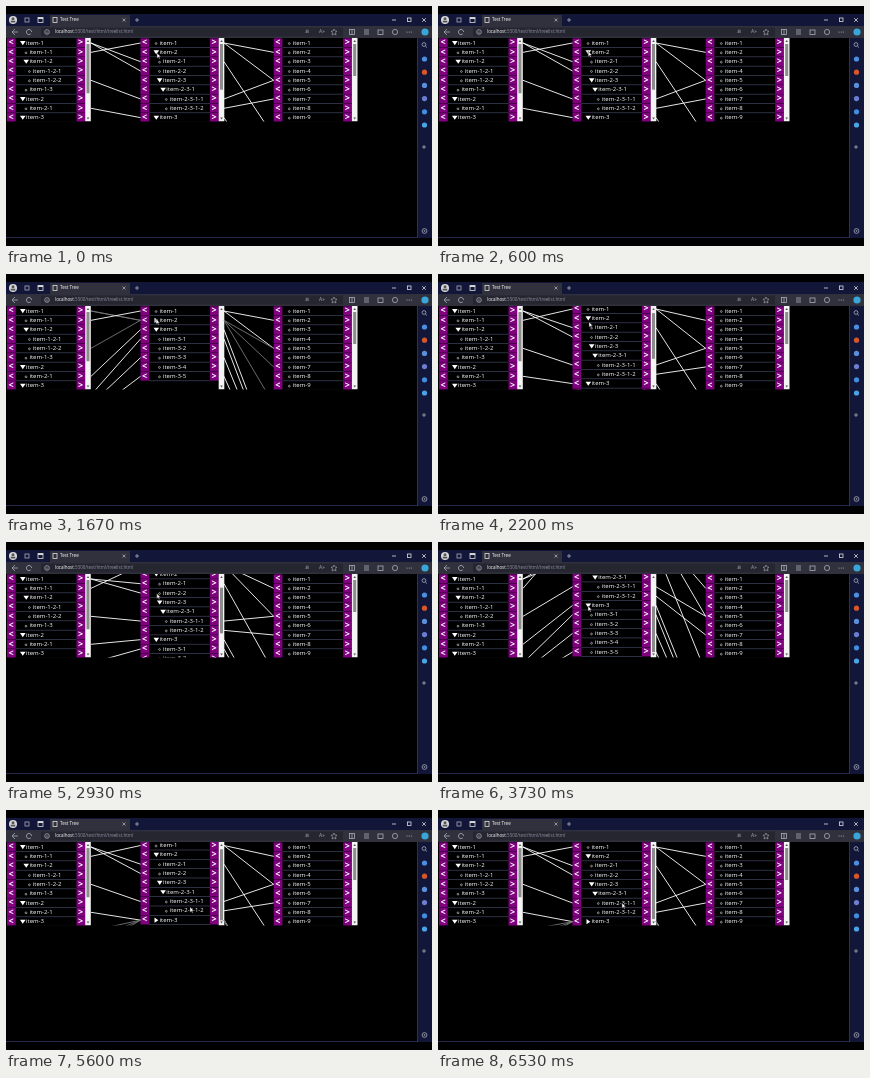
These frames come from a looping animation (426x240 px, 6.59 s). An HTML page with a canvas:

```html
<!DOCTYPE html>
<html>
<head>
<meta charset="utf-8">
<style>
html, body { margin: 0; width: 100%; height: 100%; overflow: hidden; background: #000; }
canvas { display: block; width: 426px; height: 240px; }
</style>
</head>
<body>
<canvas id="stage" width="426" height="240"></canvas>
<script>
const g = document.getElementById('stage').getContext('2d');
const LOOP = 6590, STEP = 200 / 3;
const ROW = 9.33, TOP = 32, BOTTOM = 115.5, VIEW = BOTTOM - TOP;
const FONT = '"Open Sans", "Noto Sans", sans-serif';
const NAVY = '#12173a', GREY = '#a9abb8';

const names = s => s.split(' ').map(n => 'item-' + n);
const left = names('1 1-1 1-2 1-2-1 1-2-2 1-3 2 2-1 3 3-1 3-2 3-3 3-4');
const middle = names('1 2 2-1 2-2 2-3 2-3-1 2-3-1-1 2-3-1-2 3 3-1 3-2 3-3 3-4 3-5');
const right = Array.from({ length: 20 }, (_, i) => 'item-' + (i + 1));

// [row in the outer list, item in the middle list]
const leftLinks = [[0, '2-1'], [0, '2-2'], [1, '1'], [4, '2-3-1-1'], [7, '3'],
  [9, '3-1'], [10, '3-3'], [11, '3-5']];
const rightLinks = [[1, '1'], [4, '1'], [10, '2-1'], [4, '2-3-1-1'], [6, '2-3-1-2'],
  [16, '3'], [17, '3-1'], [18, '3-3'], [19, '3-5']];

// Keys: [time, value, ...]
const scrollKeys = [[0, 0], [2067, 0], [2133, 2], [2667, 2], [3267, 48.2], [4199, 48.2],
  [4200, 1.5], [6200, 1.5], [6400, 0]];
const pointerKeys = [[0, 151, 47], [800, 150, 45], [1800, 150, 45], [2133, 151, 48],
  [2667, 151, 48], [3333, 150, 64], [4667, 150, 64], [5400, 184, 97], [6100, 184, 97],
  [6400, 184, 93]];

function at(keys, t) {
  let i = keys.findIndex(k => k[0] > t);
  if (i < 0) i = keys.length;
  const a = keys[i - 1], b = keys[i] || a;
  const p = b === a ? 0 : (t - a[0]) / (b[0] - a[0]);
  const e = p * p * (3 - 2 * p);
  return a.slice(1).map((v, j) => v + (b[j + 1] - v) * e);
}

function rect(x, y, w, h, color) {
  g.fillStyle = color;
  g.fillRect(x, y, w, h);
}

function text(s, x, y, size, color = '#fff', weight = 400) {
  g.font = `${weight} ${size}px ${FONT}`;
  g.fillStyle = color;
  g.fillText(s, x, y);
}

function path(points, color, width = 0.8, fill = false) {
  g.beginPath();
  points.forEach(p => g.lineTo(p[0], p[1]));
  if (fill) {
    g.fillStyle = color;
    g.fill();
  } else {
    g.strokeStyle = color;
    g.lineWidth = width;
    g.stroke();
  }
}

function circle(x, y, r, color, fill = true, start = 0) {
  g.beginPath();
  g.arc(x, y, r, start, Math.PI * 2);
  g.fillStyle = g.strokeStyle = color;
  g.lineWidth = 0.8;
  fill ? g.fill() : g.stroke();
}

function box(x, y, w, h, color = GREY) {
  g.strokeStyle = color;
  g.lineWidth = 0.8;
  g.strokeRect(x, y, w, h);
}

function cross(x, y, r, color = GREY) {
  path([[x - r, y - r], [x + r, y + r]], color);
  path([[x - r, y + r], [x + r, y - r]], color);
}

function plus(x, y, color = GREY) {
  path([[x - 2, y], [x + 2, y]], color);
  path([[x, y - 2], [x, y + 2]], color);
}

function drawBrowser() {
  rect(0, 0, 426, 240, '#000');
  rect(0, 8, 426, 12, NAVY);
  rect(44, 9, 80, 11, '#30313c');
  rect(0, 20, 426, 12, '#30313c');
  rect(35, 21.5, 302, 9, '#252630');
  rect(411, 32, 15, 200, NAVY);
  rect(0, 231, 412, 1, '#25284a');
  rect(411, 32, 0.8, 200, '#34375a');

  circle(7, 14, 4, '#d8d8dc');
  circle(7, 12.8, 1.5, '#555');
  rect(4.7, 14.7, 4.6, 1.8, '#555');
  box(19, 12, 4, 4);
  box(32, 11.5, 5, 5, '#ddd');
  rect(32, 11.5, 5, 1.5, '#ddd');
  box(47, 11.5, 4, 5, '#ddd');
  text('Test Tree', 54, 14, 4.5);
  cross(118, 14, 1.5);
  plus(131, 14);
  path([[386, 14], [390, 14]], '#ddd');
  box(401.5, 12, 3.5, 3.5, '#ddd');
  cross(418, 14, 1.8, '#ddd');

  path([[12, 26], [6, 26]], GREY);
  path([[9, 23], [6, 26], [9, 29]], GREY);
  circle(23, 26, 2.6, GREY, false, 0.8);
  circle(41, 26, 2.3, GREY, false);
  path([[41, 25.5], [41, 27.3]], GREY);
  text('localhost', 49, 26, 4.5);
  text(':5500/test/html/treelist.html', 49 + g.measureText('localhost').width, 26, 4.5, '#9092a4');
  text('あ', 299, 26, 4.5, GREY);
  text('A»', 313, 26, 5, GREY);
  path([[328, 23], [329, 25], [331, 25.3], [329.5, 26.7], [330, 29], [328, 27.8],
    [326, 29], [326.5, 26.7], [325, 25.3], [327, 25], [328, 23]], GREY, 0.6);
  box(343.5, 23.5, 5, 5);
  path([[346, 23.5], [346, 28.5]], GREY);
  path([[358, 24], [363, 24]], GREY);
  path([[358, 26], [363, 26]], GREY);
  path([[358, 28], [363, 28]], GREY);
  box(372, 24, 5, 4.5);
  circle(389, 26, 2.6, GREY, false);
  for (const x of [401, 403.2, 405.4]) circle(x, 26, 0.6, GREY);
  circle(419, 26, 3.6, '#3aa5d8');

  circle(418, 38.5, 1.9, GREY, false);
  path([[419.4, 40], [421, 41.6]], GREY);
  ['#4b8fe0', '#d9562c', '#5b8fd8', '#6c7ed0', '#3f8fdc', '#49a5e4'].forEach((c, i) =>
    circle(418.5, 53 + i * 13.2, 2.6, c));
  plus(418, 141);
  circle(418.5, 225, 2.4, GREY, false);
  circle(418.5, 225, 0.8, GREY);
}

function drawRow(x, y, name, isParent, closed, flat) {
  const depth = flat ? 0 : name.split('-').length - 2;
  const tx = x + 19 + depth * 3.4;
  rect(x, y - 4.66, 8.7, 9, '#800080');
  rect(x + 69.5, y - 4.66, 8.7, 9, '#800080');
  text('<', x + 1.6, y, 9, '#fff', 700);
  text('>', x + 71.1, y, 9, '#fff', 700);
  rect(x + 8.7, y + 4.2, 60.8, 0.6, '#4c5070');
  if (!isParent) circle(tx - 3.4, y + 0.5, 0.9, '#aaa', false);
  else if (closed) path([[tx - 5, y - 2.6], [tx - 1.2, y], [tx - 5, y + 2.6]], '#fff', 0, true);
  else path([[tx - 6, y - 2], [tx - 0.4, y - 2], [tx - 3.2, y + 2.2]], '#fff', 0, true);
  text(name, tx, y, 6);
}

function drawList(x, items, scroll, closed, flat, all = items) {
  items.forEach((name, i) => {
    const isParent = !flat && all.some(n => n.startsWith(name + '-'));
    drawRow(x, rowY(i) - scroll, name, isParent, name === closed, flat);
  });
  const bar = x + 78.2, total = items.length * ROW;
  rect(bar, TOP, 5.6, VIEW, '#f4f4f4');
  path([[bar + 1.5, 36], [bar + 2.8, 34], [bar + 4.1, 36]], '#555', 0, true);
  path([[bar + 1.5, 111.5], [bar + 2.8, 113.5], [bar + 4.1, 111.5]], '#555', 0, true);
  if (total > VIEW) {
    const track = VIEW - 12;
    rect(bar + 1.3, TOP + 6 + scroll / total * track, 3, VIEW / total * track, '#8c8c8c');
  }
}

const rowY = i => 37 + i * ROW;

function drawLinks(links, shown, closed, scroll, outerX, innerX) {
  for (const [row, id] of links) {
    let i = shown.indexOf('item-' + id);
    const hidden = i < 0;
    if (hidden) i = shown.indexOf(closed);
    path([[outerX, rowY(row)], [innerX, rowY(i) - scroll]], hidden ? '#777' : '#fff', 0.9);
  }
}

function draw(t) {
  const [scroll] = at(scrollKeys, t);
  const closed = t >= 860 && t < 1730 ? 'item-2' : t >= 4200 ? 'item-3' : '';
  const shown = middle.filter(n => !closed || !n.startsWith(closed + '-'));

  g.textBaseline = 'middle';
  drawBrowser();
  g.save();
  g.beginPath();
  g.rect(0, TOP, 411, VIEW);
  g.clip();
  drawList(1, left, 0);
  drawList(134.5, shown, scroll, closed, false, middle);
  drawList(267.7, right, 0, '', true);
  drawLinks(leftLinks, shown, closed, scroll, 85, 134.5);
  drawLinks(rightLinks, shown, closed, scroll, 267.7, 218);
  g.restore();

  const [x, y] = at(pointerKeys, t);
  const arrow = [[0, 0], [0, 5.2], [1.3, 4.1], [2.2, 6], [3, 5.6], [2.2, 3.8], [3.8, 3.7], [0, 0]]
    .map(p => [x + p[0], y + p[1]]);
  path(arrow, '#fff', 0, true);
  path(arrow, '#222', 0.5);
}

const start = performance.now();
function tick() {
  const t = (performance.now() - start) % LOOP;
  draw(Math.floor(t / STEP) * STEP);
  requestAnimationFrame(tick);
}
tick();
</script>
</body>
</html>
```
